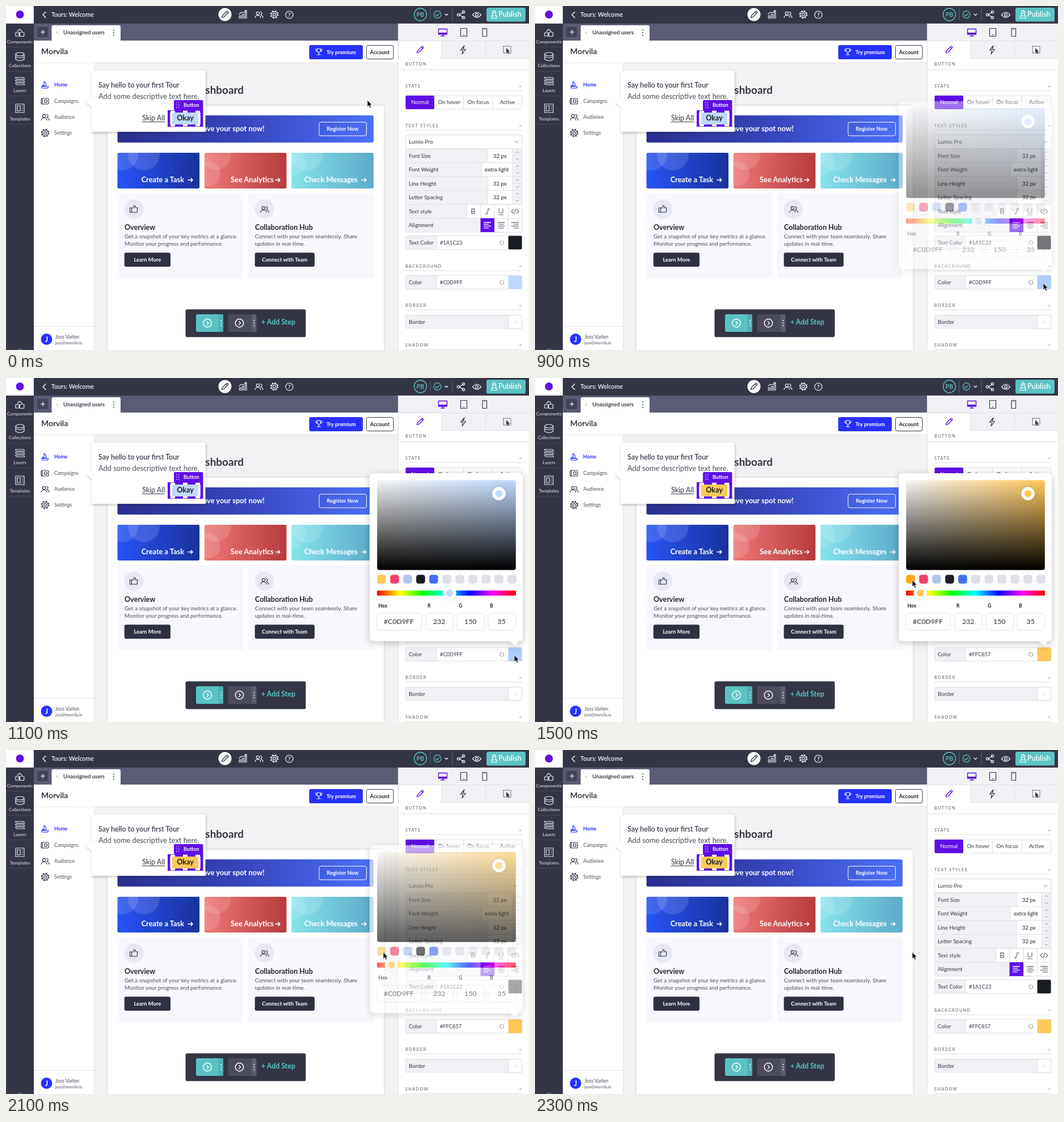
These frames come from a looping animation (922x607 px, 7.3 s). An HTML page:

```html
<!DOCTYPE html>
<html lang="en">
<head>
<meta charset="utf-8">
<title>Tour builder</title>
<style>
  html, body { margin: 0; width: 100%; height: 100%; overflow: hidden; background: #fff; }
  svg { display: block; width: 922px; height: 607px; font-family: Lato, "Open Sans", sans-serif; }
  text { white-space: pre; }
  .semi { font-weight: 600; }
  .bold { font-weight: 700; }
  .mid { text-anchor: middle; }
  .end { text-anchor: end; }
  .head { letter-spacing: 1.35px; }
</style>
</head>
<body>
<svg id="stage" viewBox="0 0 922 607"></svg>
<script>
const INK = '#353747', DARK = '#343645', PURPLE = '#5f0fe5', BLUE = '#2731ff',
      GREY = '#f1f1f5', LINE = '#dedee6', TEAL = '#5bc3c3', MUTED = '#9a9ba8';
const SKY = '#c0d9ff', AMBER = '#ffc857', PICK = 'var(--pick)';

const rect = (x, y, w, h, fill, r = 0, extra = '') =>
  `<rect x="${x}" y="${y}" width="${w}" height="${h}" rx="${r}" fill="${fill}" ${extra}/>`;
const box = (x, y, w, h, fill = '#fff', r = 0, stroke = LINE) =>
  rect(x, y, w, h, fill, r, `stroke="${stroke}"`);
const disc = (x, y, r, fill, extra = '') =>
  `<circle cx="${x}" cy="${y}" r="${r}" fill="${fill}" ${extra}/>`;
const ring = (x, y, r, color, w = 1.2, extra = '') =>
  disc(x, y, r, 'none', `stroke="${color}" stroke-width="${w}" ${extra}`);
const shape = (d, fill, extra = '') => `<path d="${d}" fill="${fill}" ${extra}/>`;
const line = (d, color = INK, w = 1.2) =>
  shape(d, 'none', `stroke="${color}" stroke-width="${w}" stroke-linecap="round" stroke-linejoin="round"`);
const text = (x, y, s, size = 9.7, fill = INK, cls = '', extra = '') =>
  `<text x="${x}" y="${y}" font-size="${size}" fill="${fill}" class="${cls}" ${extra}>${s}</text>`;
const at = (x, y, s, extra = '') => `<g transform="translate(${x} ${y})" ${extra}>${s}</g>`;
const gradient = (id, stops, extra = '') => `<linearGradient id="${id}" ${extra}>` + stops.map((c, i) =>
  `<stop offset="${i / (stops.length - 1)}" stop-color="${c}"/>`).join('') + '</linearGradient>';
const shadow = (id, dx, dy, blur, alpha) => `<filter id="${id}" x="-30%" y="-30%" width="160%" height="160%">
  <feDropShadow dx="${dx}" dy="${dy}" stdDeviation="${blur}" flood-color="#222" flood-opacity="${alpha}"/></filter>`;
const repeat = (n, fn) => Array.from({ length: n }, (_, i) => fn(i)).join('');
const dots = (x, y, step, color, n = 3, r = 1) => repeat(n, i => disc(x, y + i * step, r, color));

const people = (x, y, c) => at(x, y, ring(-2, -2.5, 2.6, c) + line('M-7 5Q-6.5 1-2 1T3 5M2-5Q5.2-5 5-2.5T2.6 0M4 1Q7 2 7 5', c));
const gear = (x, y, c) => at(x, y, ring(0, 0, 2.3, c) + ring(0, 0, 5.2, c) + ring(0, 0, 6.4, c, 1.8, 'stroke-dasharray="2.5 2.53"'));
const pencil = (x, y, c) => at(x, y, line('M-5.5 5.5L-4.5 2 3-5.5Q4-6.3 5.5-5 6.3-4 5.5-3L-2 4.5ZM2-4.5L4.5-2', c, 1.3));
const arrow = (x, y) => line(`M${x} ${y}h8m-3-3l3 3-3 3`, '#fff', 1.5);
const layer = y => line(`M16.5 ${y}H31l2 3H18.5Z`, '#e8e8ee', 1.1);

const defs = `<defs>
  ${gradient('banner', ['#2b2e8d', '#3846bd', '#4a70f8'])}
  ${gradient('card0', ['#2553f4', '#1a329d'])}
  ${gradient('card1', ['#ee7777', '#b63b3e'])}
  ${gradient('card2', ['#85e3e9', '#5dabcb'])}
  ${gradient('hue', ['#f00', '#ff0', '#0f0', '#0ff', '#00f', '#f0f', '#f00'])}
  ${gradient('tint', ['#f6f6f6', PICK])}
  ${gradient('shade', ['#0000', '#000'], 'x2="0" y2="1"')}
  ${shadow('lift', 0, 3, 7, .24)}
  ${shadow('edge', 1, 2, 2, .26)}
  ${shadow('soft', 0, 0, 2, .14)}
  ${repeat(3, i => `<clipPath id="clip${i}">${rect(196.3 + i * 153.4, 259, 145, 63, '#000', 3)}</clipPath>`)}
</defs>`;

function topBar() {
  const white = '#f3f3f7';
  return rect(0, 0, 922, 31, DARK) + rect(0, 0, 49, 31, '#fff') + disc(24.5, 15, 7, PURPLE)
    + line('M70 10.5L65 15.5 70 20.5', white, 1.5) + text(80, 18.7, 'Tours: Welcome', 10.6, white, 'semi')
    + disc(386, 15, 11.5, '#fff') + pencil(386, 15, DARK)
    + line('M411.5 22V17h2.5v5M416.5 22V14.5h2.5V22M421.5 22V12h2.5V22M411 14l4-3 3 1 6-4m-3 0h3v3', white)
    + people(446, 15.5, white) + gear(473, 15, white)
    + ring(499.5, 15.5, 6.5, white) + text(499.5, 19, '?', 10, white, 'mid bold')
    + ring(730.5, 15, 11, TEAL, 1.3) + text(730.5, 19, 'PB', 10.5, TEAL, 'mid semi')
    + line('M748 5V25M787 5V25', '#646675', 1) + ring(760.5, 15, 6.3, TEAL) + line('M757.5 15l2.2 2.3 4-4.2', TEAL)
    + line('M774 14l2.5 2.5L779 14', white)
    + line('M799 15.5L806 11M799 15.5L806 20', white)
    + ring(797.5, 15.5, 2.1, white) + ring(806.5, 10.5, 2.1, white) + ring(806.5, 20.5, 2.1, white)
    + line('M822.5 15.5Q830 6.5 837.5 15.5 830 24.5 822.5 15.5Z', white) + ring(830, 15.5, 2.3, white)
    + rect(847, 3, 69, 24.5, TEAL, 3)
    + line('M857.5 17v-4q0-3.5 3-5.5 3 2 3 5.5v4M856 21.5v-4h9v4Z', '#fff') + disc(860.5, 12.5, 1.2, '#fff')
    + text(868, 19.3, 'Publish', 12.6, '#fff', 'semi');
}

function sidebar() {
  const pale = '#e8e8ee';
  const items = [['Components', 65.5], ['Collections', 108], ['Layers', 151.5], ['Templates', 201.5]];
  return rect(0, 31, 49, 576, DARK)
    + items.map(([s, y]) => text(24.5, y, s, 8, pale, 'mid')).join('')
    + line('M0 72.5H49M0 115.5H49M0 158.5H49M0 208.5H49', '#454756', 1)
    + line('M17 53v-6h6v6ZM24.5 53.5l-.5-6 4-2 4 2-.5 6ZM20 45l4-4 4 3', pale)
    + line('M17 85v9q7.5 5 15 0v-9M17 89.5q7.5 4 15 0M17 85a7.5 3 0 0 1 15 0a7.5 3 0 0 1-15 0', pale)
    + layer(126) + layer(131) + layer(136)
    + line('M17 173h15v15H17ZM20 176h5v9H20ZM28 176h1.5M28 180h1.5M28 184h1.5', pale)
    + line('M20 607q4.5-3 9 0', MUTED);
}

function appShell() {
  const menu = [['Home', 139], ['Campaigns', 167.5], ['Audience', 196], ['Settings', 224]];
  return rect(49, 31, 642, 30.5, '#5a5c73') + rect(55, 37, 19, 18, '#424455', 2) + line('M61.5 46h7M65 42.5v7', '#fff')
    + shape('M80.5 61.5V37q0-3 3-3H199q3 0 3 3v24.5Z', '#fff')
    + disc(90, 47, 2.2, '#dfe2ce') + text(101, 49.5, 'Unassigned users', 9.5, '#222431', 'semi') + dots(190, 42.5, 4.5, INK)
    + rect(49, 61, 642, 546, '#f2f2f4') + rect(49, 61, 642, 39, '#fff') + rect(49, 100, 106, 507, '#fff')
    + line('M49 100H691M155.5 100V607M49 565.5H155', '#e5e5ec', 1)
    + text(62, 85, 'Morvila', 14, '#24252e', 'semi')
    + rect(534.5, 69, 94.5, 25, BLUE, 3)
    + line('M548.5 75h6v5q-3 4-6 0ZM546 76q0 4 3 4M557 76q0 4-3 4M551.5 82v4m-3 0h6', '#fff')
    + text(565, 84.5, 'Try premium', 9.3, '#fff', 'bold')
    + box(635.5, 69.5, 47.5, 24, '#fff', 3, DARK) + text(659, 84.5, 'Account', 9.3, '#20222b', 'mid bold')
    + menu.map(([s, y], i) => text(85, y + 3.2, s, i ? 8.9 : 8.6, i ? '#50525f' : BLUE, i ? '' : 'bold')).join('')
    + line('M67 133v7h-3M67 133q4 3 4 8h-7M63 142h12l-2 3H64Z', BLUE)
    + line('M62 165q0-2 2-2h9q2 0 2 2v6q0 2-2 2H64q-2 0-2-2ZM64 163v9') + ring(70, 168, 2.5, INK)
    + people(69, 196.5, INK) + gear(69, 224, INK)
    + disc(71.5, 588, 10, BLUE) + text(71.5, 592.5, 'J', 12.5, '#fff', 'mid bold')
    + text(87, 586.5, 'Joss Varlen', 8.7, '#4b4d5a') + text(87, 596.5, 'joss@morvila.io', 7, '#4b4d5a');
}

function dashboard() {
  const tiles = [
    ['Create a Task', 314, [[205, 262, 28], [243, 262, 28]]],
    ['See Analytics', 472, [[370, 262, 27], [356, 296, 22]]],
    ['Check Messages', 620, [[530, 262, 29], [503, 276, 25]]],
  ];
  const tile = ([label, end, bubbles], i) => `<g clip-path="url(#clip${i})">`
    + rect(196.3 + i * 153.4, 259, 145, 63, `url(#card${i})`)
    + bubbles.map(b => disc(...b, '#fff', 'opacity=".13"')).join('') + '</g>'
    + text(end, 311, label, 12.8, '#fff', 'end bold') + arrow(end + 7 - 4 * (i === 1), 307);
  const infoCard = (x, title, line1, line2, label, w) => rect(x, 330, 221.5, 150, '#f7f7fd', 3)
    + disc(x + 29, 358.5, 17, '#e8e8f5') + text(x + 12.5, 395, title, 12.5, '#22242e', 'bold')
    + text(x + 12.5, 409.5, line1, 9.8, '#4b4d5a') + text(x + 12.5, 422.5, line2, 9.8, '#4b4d5a')
    + rect(x + 12.2, 435.3, w, 24.7, '#2f3141', 3) + text(x + 12.2 + w / 2, 451, label, 9.4, '#fff', 'mid bold');
  return text(419, 155, 'Dashboard', 18.9, '#353640', 'end bold')
    + rect(179, 176, 487, 460, '#fff', 3, 'filter="url(#soft)"')
    + rect(196.5, 193, 451.5, 48, 'url(#banner)', 3) + text(456, 221, 'Save your spot now!', 12.9, '#fff', 'end bold')
    + box(552, 205, 83.5, 24, 'none', 3, '#fff') + text(593.5, 220.2, 'Register Now', 9.4, '#fff', 'mid bold')
    + tiles.map(tile).join('')
    + infoCard(196.5, 'Overview', 'Get a snapshot of your key metrics at a glance.',
      'Monitor your progress and performance.', 'Learn More', 81.3)
    + infoCard(426.5, 'Collaboration Hub', 'Connect with your team seamlessly. Share',
      'updates in real-time.', 'Connect with Team', 105.3)
    + line('M218.5 356h3v8h-3ZM221.5 357l3-1 1.5-4q2.5 0 2 4h4l-1 8h-9.5') + people(456, 359, INK);
}

function stepBar() {
  const step = (x, w, fill, strip) => rect(x, 544, w, 31, fill, 3) + rect(x + w - 8.5, 544, 8.5, 31, strip, 2)
    + dots(x + w - 4, 555, 4.5, '#fff') + ring(x + 20, 559.5, 7.2, '#fff', 1.4) + line(`M${x + 19} 556.5l3 3-3 3`, '#fff', 1.4);
  return rect(316.5, 535.3, 212, 49, DARK, 3) + step(335, 48, TEAL, '#4fb1b4') + step(391.5, 50, '#4a4c5b', '#5b5d70')
    + text(450, 562, '+ Add Step', 12.4, TEAL, 'bold');
}

function tourPopup() {
  return shape('M151 114h200.5v108H151V178L141 169 151 163Z', '#fff', 'filter="url(#edge)"')
    + text(163, 143.5, 'Say hello to your first Tour', 12.4, '#3b3d4c', 'semi')
    + text(163, 163.5, 'Add some descriptive text here.', 12.8, '#4b4d5b')
    + text(240, 202, 'Skip All', 12.5, '#33353f') + line('M240 204.5H280', '#33353f', 1)
    + rect(296, 166, 51.5, 19, PURPLE, 2) + dots(301, 170.5, 4.2, '#c4a5ff') + dots(304.7, 170.5, 4.2, '#c4a5ff')
    + text(313, 177.5, 'Button', 9, '#fff', 'bold')
    + rect(285, 184, 62.5, 29, PURPLE) + rect(289.3, 188, 53.5, 21, '#fff') + rect(293, 188, 46, 21, PICK)
    + shape('M290 186.5H342M290 210.5H342', 'none', 'stroke="#fff" stroke-width="3.4" stroke-dasharray="8 14"')
    + text(316, 202, 'Okay', 12.6, '#1a1c23', 'mid bold');
}

function panel() {
  const heading = (y, s, fold = true) => text(704, y + 2.7, s, 7.3, '#5b5d6b', 'head')
    + (fold ? shape(`M904 ${y + 1.5}l2.8-3 2.8 3Z`, '#c4c4ce') + line(`M704.5 ${y + 8}H909`, '#e2e2e9', 1) : '');
  const stepper = (y, label, value, x = 849) => box(704.5, y, 205, 24.5, GREY) + rect(x, y + .5, 893 - x, 23.5, '#fff')
    + text(710, y + 15.5, label) + text((x + 892.5) / 2, y + 15.5, value, 9.7, '#22242e', 'mid')
    + line(`M${x} ${y}v24M893 ${y}v24M893.5 ${y + 12}H909`, LINE, 1)
    + line(`M899 ${y + 7}l2.5-2.5 2.5 2.5M899 ${y + 17}l2.5 2.5 2.5-2.5`, '#8d8e9b', 1);
  const colorRow = (y, label, id, fill) => box(704.5, y, 205, 24, '#fff', 2) + rect(705, y + .5, 54, 23, GREY)
    + line(`M759 ${y}v24`, LINE, 1) + text(710, y + 15.5, label)
    + line(`M871.5 ${y + 14.5}a3.8 3.8 0 0 1 2-6m2 .3a3.8 3.8 0 0 1 1 6.2m-1.5 .7a3.8 3.8 0 0 1-2-.3`, '#777987', 1)
    + text(765, y + 15.2, '#1A1C23', 9.3, INK, '', `id="${id}Hex"`)
    + rect(885.5, y, 24, 24, fill, 2, `id="${id}Chip"`);
  const lines = (x, y, c, shift) => line(repeat(4, i =>
    `M${x + i % 2 * shift} ${y + i * 3.2}h${i % 2 ? 8 : 12}`), c, 1.3);
  return rect(691, 31, 231, 576, '#fff') + rect(691, 31, 231, 61, GREY) + rect(692, 62, 75.5, 30, '#fff')
    + line('M691.5 31V607M692 61.5H922M767.5 62V92M845.5 62V92M767 92.5H922M692 112.5H922', '#dfdfe7', 1)
    + line('M762.5 40.5h15v9.5h-15ZM770 50v3m-3 0h6', PURPLE, 1.4) + rect(763, 47, 14, 3, PURPLE)
    + line('M801.5 39.5h11v14h-11ZM806 51h2M840 39.5h7.5v14H840ZM843 41.5h1.5') + pencil(730, 77, PURPLE)
    + line('M808 70l-6.5 8h4l-1.5 7 6.5-8.5h-4.5Z')
    + shape('M877 71h13v12H877Z', 'none', `stroke="${INK}" stroke-dasharray="2 1"`)
    + shape('M882 74v9l2-2 1.5 3.5 1.7-.8-1.7-3.2h3Z', INK)
    + heading(102, 'BUTTON', false) + heading(141.5, 'STATE')
    + box(704.5, 158.5, 205, 23.5, '#fff', 2) + rect(704.5, 158, 50.5, 24, PURPLE, 2)
    + line('M806.5 158.5V182M858 158.5V182', LINE, 1)
    + ['Normal', 'On hover', 'On focus', 'Active'].map((s, i) =>
      text(729.8 + i * 51.4, 173.3, s, 9.6, i ? INK : '#fff', 'mid')).join('')
    + heading(211, 'TEXT STYLES')
    + box(704.5, 227.5, 205, 24.5) + text(710, 242.7, 'Lumio Pro') + line('M897 238.5l3 3 3-3', '#777987', 1)
    + stepper(252, 'Font Size', '32 px') + stepper(276.5, 'Font Weight', 'extra light', 838)
    + stepper(301, 'Line Height', '32 px') + stepper(325.5, 'Letter Spacing', '32 px')
    + box(704.5, 350, 205, 24.5, GREY) + box(704.5, 374.5, 205, 24.5, GREY)
    + text(710, 365.5, 'Text style') + text(710, 390, 'Alignment')
    + repeat(4, i => box(812.5 + i * 24.25, 350, 24.25, 24.5)) + repeat(2, i => box(861 + i * 24.25, 374.5, 24.25, 24.5))
    + rect(836.5, 374.5, 24.5, 24.5, PURPLE)
    + text(823.5, 367, 'B', 13, '#777987', 'mid bold')
    + line('M845 367h4m-2 0l4-9m-2 0h4M869 357.5v4q0 4 3.5 4t3.5-4v-4M868 368.5h9M894.5 359l-3.5 3.5 3.5 3.5M900.5 359l3.5 3.5-3.5 3.5M896.5 367l2-9', '#6d6f7d')
    + lines(842.5, 382, '#fff', 0) + lines(867, 382, '#6d6f7d', 2) + lines(891.5, 382, '#6d6f7d', 4)
    + colorRow(405.5, 'Text Color', 'text', '#1a1c23')
    + heading(459, 'BACKGROUND') + colorRow(475.5, 'Color', 'fill', PICK)
    + heading(528.5, 'BORDER') + box(704.5, 545.5, 205, 23.5, GREY, 2) + box(885.5, 545.5, 24, 23.5)
    + text(710, 560.5, 'Border') + line('M895 557.5l2 2 4-4', '#d0d0d8', 1) + heading(598, 'SHADOW');
}

function picker() {
  const swatches = [AMBER, '#f43f67', '#b0c5ee', '#1c1b24', '#4070f4'];
  const thumb = (id, x, y) => at(x, y, disc(0, 0, 11.8, '#fff', 'filter="url(#soft)"') + disc(0, 0, 6.3, PICK), `id="${id}"`);
  const field = (x, w, label, value) => text(x + 3.5, 405, label, 8.6, '#1d1e27', 'bold')
    + box(x + .5, 415, w, 30, '#fff', 5, '#e4e4ec') + text(x + w / 2, 434.2, value, 12.3, '#2c2e3a', 'mid');
  return '<g id="picker">'
    + shape('M649 168H903q8 0 8 8V456q0 8-8 8l-4 8-11-8H649q-8 0-8-8V176q0-8 8-8Z', '#fff', 'filter="url(#lift)"')
    + rect(654.3, 180.3, 244.5, 158.5, 'url(#tint)', 4) + rect(654.3, 180.3, 244.5, 158.5, 'url(#shade)', 4)
    + repeat(11, i => rect(654.2 + i * 23, 347.2, 15.6, 15.6, swatches[i] || '#dfdfe8', 4.5, `id="swatch${i}"`))
    + rect(654, 375, 245, 9, 'url(#hue)', 2) + thumb('tone', 869, 204) + thumb('hueThumb', 782, 379.5)
    + field(653, 79, 'Hex', '#C0D9FF') + field(739.5, 48.5, 'R', '232')
    + field(794.5, 48.5, 'G', '150') + field(849.5, 48.5, 'B', '35') + '</g>';
}

const pointer = shape('M0 0V12L2.7 9.5 4.6 13.7 6.8 12.7 5 8.7H8.5Z', '#111', 'id="pointer" stroke="#fff" stroke-width=".8"');
const $ = id => document.getElementById(id);
$('stage').innerHTML = defs + topBar() + appShell() + dashboard() + stepBar() + tourPopup() + sidebar() + panel() + picker() + pointer;

// Linear interpolation through [time, value] keys.
function track(t, keys) {
  const i = keys.findIndex(k => k[0] > t);
  if (i < 0) return keys[keys.length - 1][1];
  if (!i) return keys[0][1];
  const [t0, a] = keys[i - 1], [t1, b] = keys[i];
  return a + (b - a) * (t - t0) / (t1 - t0);
}
const curve = (a, c, b, u) => a * (1 - u) ** 2 + 2 * c * u * (1 - u) + b * u * u;

function draw() {
  const t = Math.floor(performance.now() % 7300 / 100) * 100;   // ten ticks a second
  const down = track(t, [[400, 0], [500, .3], [600, .66], [700, .91], [800, 1]]);
  const back = track(t, [[1200, 0], [1300, .4], [1400, .88], [1500, 1]]);
  const x = curve(637, 634, 896, down) + (665 - 896) * back;
  const y = curve(166, 463, 489, down) + (356.5 - 489) * back;
  const shown = track(t, [[800, 0], [900, .4], [1000, .8], [1100, 1], [1900, 1], [2000, .88], [2100, .62], [2200, .25], [2300, 0]]);
  const picked = t >= 1500;
  $('stage').style.setProperty('--pick', picked ? AMBER : SKY);
  $('pointer').setAttribute('transform', `translate(${x} ${y})`);
  $('picker').setAttribute('opacity', shown);
  $('hueThumb').setAttribute('transform', `translate(${picked ? 679.5 : 782} 379.5)`);
  $('swatch0').setAttribute('fill', picked && t < 2000 ? '#ffaa0f' : AMBER);
  $('fillChip').setAttribute('fill', t >= 800 && t < 1300 ? '#b0cdfb' : PICK);
  $('fillHex').textContent = picked ? '#FFC857' : SKY.toUpperCase();
  requestAnimationFrame(draw);
}
draw();
</script>
</body>
</html>
```
